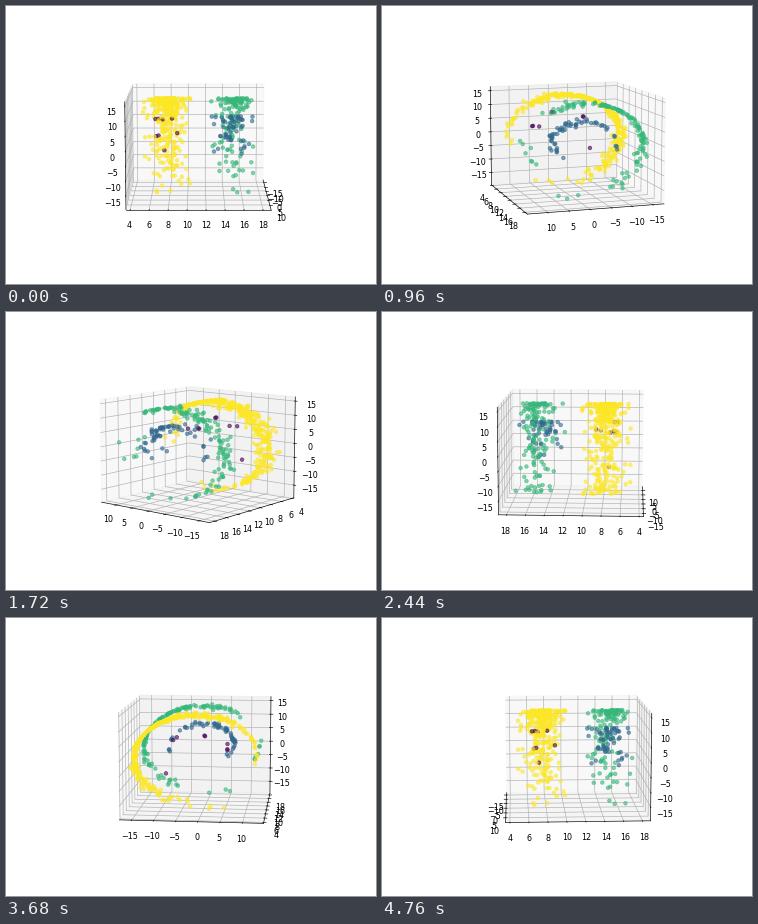
Write a matplotlib script that moves like this. It is 370 px wide and 278 px high and loops after 4.8 s.

```python
import numpy as np
import matplotlib.pyplot as plt
from matplotlib.animation import FuncAnimation

WIDTH, HEIGHT = 370, 278
DPI = WIDTH / 6.4
FRAMES = 120
STEP = 360 / FRAMES

rng = np.random.default_rng(4)


def cluster(t_mean, y_mean, count):
    """Gaussian blob in the flat (t, y) plane of the roll."""
    spread = np.clip(rng.normal(size=(count, 2)), -2.7, 2.7)
    return spread - spread.mean(axis=0) + (t_mean, y_mean)


clusters = [
    cluster(7.9, 7.3, 8),
    cluster(7.5, 14.9, 58),
    cluster(15, 15.15, 135),
    cluster(15, 7.7, 340),
]
labels = np.repeat(np.arange(4), [len(c) for c in clusters])
t, y = np.vstack(clusters).T

fig = plt.figure(figsize=(WIDTH / DPI, HEIGHT / DPI), dpi=DPI)
ax = fig.add_subplot(projection="3d")
ax.scatter(t * np.cos(t), y, t * np.sin(t), c=labels, cmap="viridis",
           s=20, alpha=0.6, depthshade=False)
ax.set_xlim(-17.8, 14.7)
ax.set_ylim(3.55, 18.85)
ax.set_zlim(-19.6, 16.47)


def update(frame):
    ax.view_init(elev=10, azim=frame * STEP)
    return []


anim = FuncAnimation(fig, update, frames=FRAMES, interval=40,
                     init_func=lambda: [], repeat=True, repeat_delay=0)
plt.show()
```
